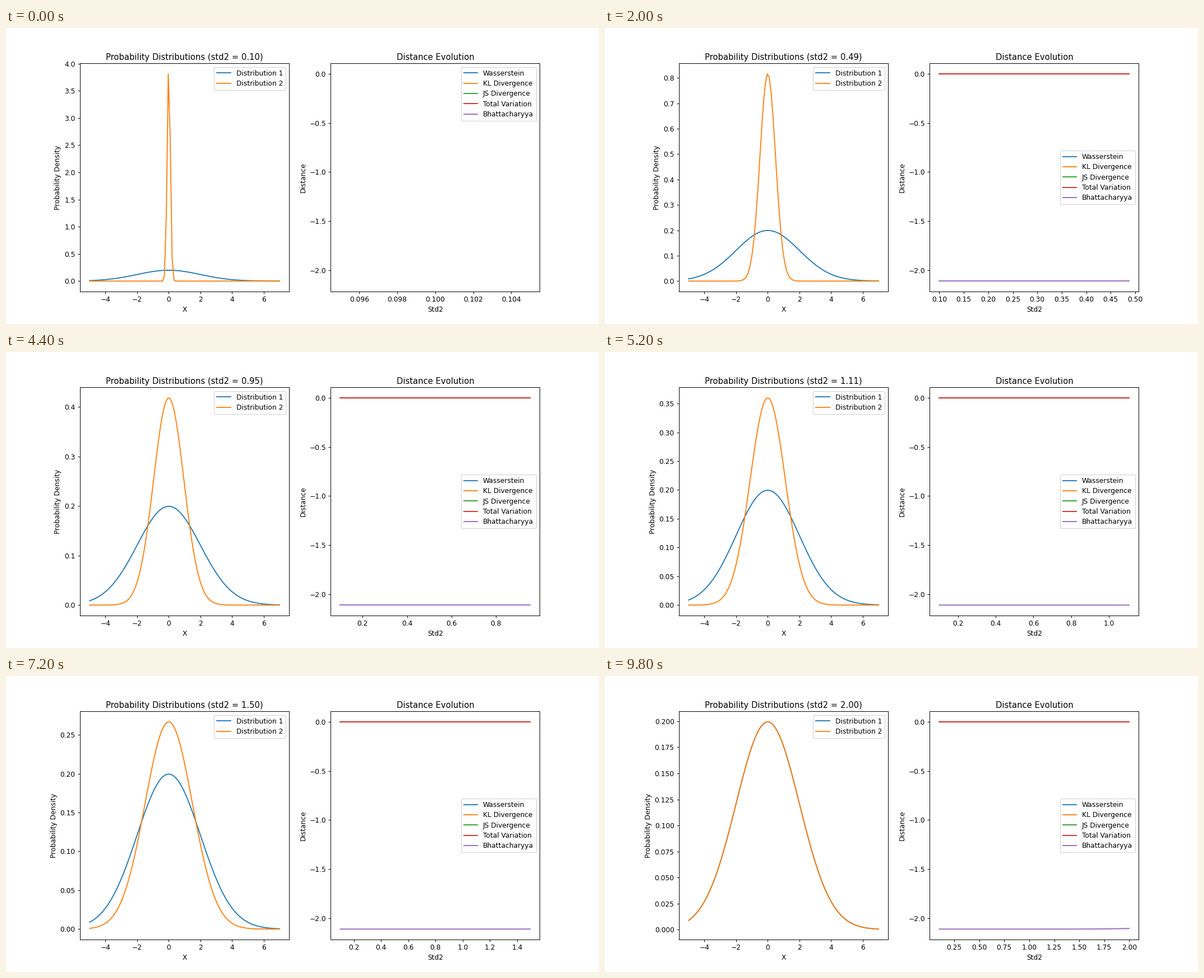
A matplotlib script for the animation above (10000 ms loop, 1058 by 529 pixels).

```python
import numpy as np
import matplotlib.pyplot as plt
from matplotlib.animation import FuncAnimation

WIDTH = 1058
FRAMES = 50
STD1 = 2.0
METRICS = ["Wasserstein", "KL Divergence", "JS Divergence",
           "Total Variation", "Bhattacharyya"]

plt.rcParams.update({
    "font.family": "DejaVu Sans",
    "axes.titlepad": 5.4,
    "legend.labelspacing": 0.44,
})

x = np.linspace(-5, 7, 100)
stds = np.linspace(0.1, 2.0, FRAMES)


def normal(std):
    return np.exp(-0.5 * (x / std) ** 2) / (std * np.sqrt(2 * np.pi))


# Each density is measured against itself, so only the unnormalised
# Bhattacharyya sum differs from zero.
distances = np.zeros((len(METRICS), FRAMES))
distances[-1] = [-np.log(normal(s).sum()) for s in stds]

fig, (left, right) = plt.subplots(1, 2, figsize=(12, 6), dpi=WIDTH / 12)


def decorate(ax, title, xlabel, ylabel):
    ax.set_title(title)
    ax.set_xlabel(xlabel)
    ax.set_ylabel(ylabel)
    ax.legend()


def update(i):
    left.clear()
    left.plot(x, normal(STD1), label="Distribution 1")
    left.plot(x, normal(stds[i]), label="Distribution 2")
    decorate(left, f"Probability Distributions (std2 = {stds[i]:.2f})",
             "X", "Probability Density")

    right.clear()
    for name, values in zip(METRICS, distances):
        right.plot(stds[:i + 1], values[:i + 1], label=name)
    decorate(right, "Distance Evolution", "Std2", "Distance")


anim = FuncAnimation(fig, update, frames=FRAMES, init_func=lambda: None,
                     interval=200, repeat=True, repeat_delay=0)
plt.show()
```
